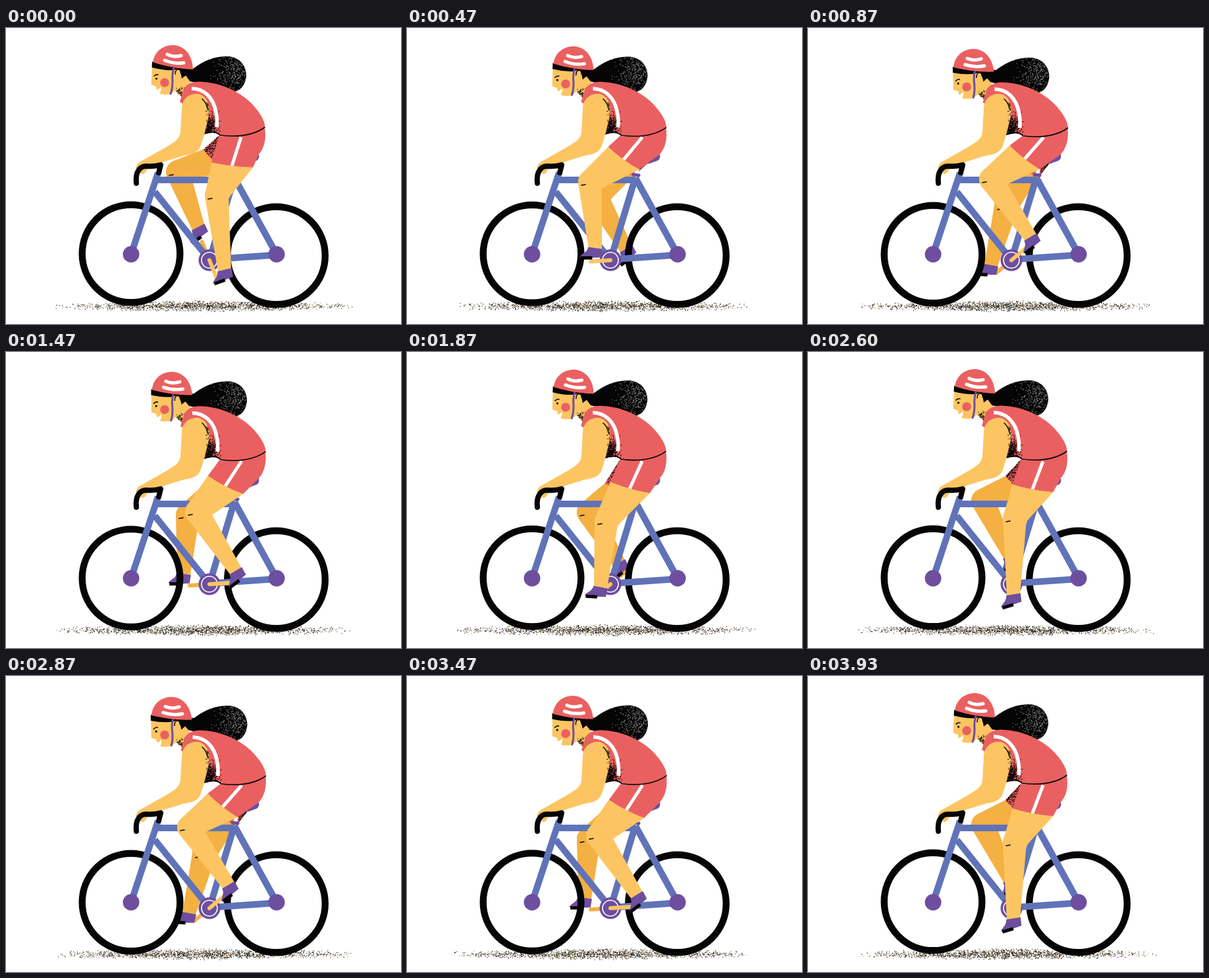
These frames come from a looping animation (600x450 px, 3990 ms). An HTML page with a canvas:

```html
<!DOCTYPE html>
<html lang="en">
<head>
<meta charset="utf-8">
<title>Cyclist</title>
<style>
html, body { margin: 0; width: 100%; height: 100%; overflow: hidden; background: #fff; }
canvas { display: block; width: 600px; height: 450px; }
</style>
</head>
<body>
<canvas id="stage" width="600" height="450"></canvas>
<script>
const ctx = document.getElementById('stage').getContext('2d');
const RED = '#ea6061', SKIN = '#fcc562', SHADE = '#f4b042', BLUE = '#6073b8',
      PURPLE = '#6d4e9f', INK = '#050505', WHITE = '#fff';
const LOOP = 3990, STEP = 200 / 3, COUNT = 60, TURN = 10;
const HUB = [309, 353], CRANK = 30;

// One pedal turn: knee, ankle and foot tilt in degrees
const POSES = [
  [320, 255, 332, 368, -10], [305, 252, 343, 356, -22],
  [290, 243, 349, 333, -28], [278, 230, 338, 318, -28],
  [268, 212, 322, 306, -28], [263, 205, 308, 300, -25],
  [265, 217, 290, 319, -10], [278, 234, 286, 335, 10],
  [303, 257, 294, 358, 13], [314, 253, 312, 369, -7]
];
const BOB = [0, .3, .7, 1, .9, .7, .5, .3, .15, .02];

const SHAPES = {
  torso: 'M264 112L270 92C276 84 286 80 300 82C330 84 365 100 384 128C391 138 394 146 393 152C375 164 350 166 324 163C318 157 308 159 297 162L288 130Z',
  trim: 'M282 92C300 92 315 105 319 128C321 138 321 145 320 151',
  waist: 'M300 161C312 157 320 157 325 163C350 166 375 164 393 151',
  arm: 'M267 122C268 105 281 99 292 100C306 103 312 120 307 138C303 155 300 168 295 181C291 190 282 192 270 194L215 211C214 219 209 224 205 221L197 212L201 205L245 180C258 172 264 168 265 158Z',
  crease: 'M298 108Q304 113 306 122',
  bar: 'M198 236C196 218 204 210 213 210Q226 211 235 208L232 220',
  hair: 'M256 58L284 62C300 50 315 43 338 43C356 45 365 58 365 72C364 88 354 97 345 97C330 97 322 89 304 85C288 81 272 84 264 72Z',
  face: 'M222 58L220.500 86L228 89C228 95 231 101 240 101C247 102 253 100 257 95L268 106L286 90L270 68L262 56Z',
  band: 'M222 51C245 55 262 58 284 62L283 67Q272 72 267 77C266 66 261 61 255 64Q240 65 221.500 60Z',
  helmet: 'M223 52C226 34 240 26 254 26C271 27 283 40 284 63C262 62 245 59 223 52Z',
  vents: 'M245 40Q254 45 266 42M241 49Q255 55 270 53',
  smile: 'M226 95Q232 94 235 90Q237 96 232 100Z',
  strap: 'M255 61Q252 70 253 80Q253 92 250 100',
  ear: 'M257 70Q257 62 263 63',
  brow: 'M225 73Q228 70 231 71',
  shoe: 'M-11 0L11 -1L11 12L-3 15L-21 17C-18 10 -11 9 -11 0Z'
};
for (const key in SHAPES) SHAPES[key] = new Path2D(SHAPES[key]);

function random(seed) {
  let s = (seed * 7919 + 12345) >>> 0;
  return () => {
    s = (s + 0x6d2b79f5) >>> 0;
    let t = Math.imul(s ^ s >>> 15, 1 | s);
    t ^= t + Math.imul(t ^ t >>> 7, 61 | t);
    return ((t ^ t >>> 14) >>> 0) / 4294967296;
  };
}

function fill(shape, color) {
  ctx.fillStyle = color;
  ctx.fill(shape);
}

function stroke(shape, color, width, cap = 'round') {
  ctx.strokeStyle = color;
  ctx.lineWidth = width;
  ctx.lineCap = cap;
  ctx.lineJoin = 'round';
  ctx.stroke(shape);
}

function line(a, b, color, width, cap) {
  const p = new Path2D();
  p.moveTo(...a);
  p.lineTo(...b);
  stroke(p, color, width, cap);
}

function circle(x, y, r) {
  const p = new Path2D();
  p.arc(x, y, r, 0, Math.PI * 2);
  return p;
}

function polygon(points) {
  const p = new Path2D();
  points.forEach(q => p.lineTo(...q));
  p.closePath();
  return p;
}

// Two circles joined by their outer tangents
function limb(a, ra, b, rb) {
  const dx = b[0] - a[0], dy = b[1] - a[1];
  const dir = Math.atan2(dy, dx), off = Math.acos((ra - rb) / Math.hypot(dx, dy));
  const p = new Path2D();
  p.arc(...a, ra, dir + off, dir - off + Math.PI * 2);
  p.arc(...b, rb, dir - off, dir + off);
  p.closePath();
  return p;
}

// Shift, then turn by some degrees about a pivot
function moved(x, y, draw, turn = 0, px = 0, py = 0) {
  ctx.save();
  ctx.translate(x + px, y + py);
  ctx.rotate(turn * Math.PI / 180);
  ctx.translate(-px, -py);
  draw();
  ctx.restore();
}

function clipped(clip, draw) {
  ctx.save();
  ctx.clip(clip);
  draw();
  ctx.restore();
}

function grain(clip, seed, count, x, y, sx, sy, color) {
  const r = random(seed), bell = () => r() + r() + r() - 1.5;
  clipped(clip, () => {
    ctx.fillStyle = color;
    for (let i = 0; i < count; i++) ctx.fillRect(x + bell() * sx, y + bell() * sy, 1.1, 1.1);
  });
}

function ground(seed) {
  const r = random(seed + 100);
  for (let i = 0; i < 1700; i++) {
    const s = r() + r() - 1, v = r() + r() - 1;
    ctx.fillStyle = r() < .72 ? '#16110a' : '#a98a58';
    ctx.fillRect(300 + s * 230, 422.5 + v * 9 * (1 - .4 * Math.abs(s)), 1.1, 1.1);
  }
}

function pedal(phase) {
  const a = (68 - 36 * phase) * Math.PI / 180;
  return [HUB[0] + CRANK * Math.cos(a), HUB[1] + CRANK * Math.sin(a)];
}

function leg(phase, far, bob) {
  const [kx, ky, ax, ay, tilt] = POSES[phase];
  const hip = far ? [346, 190] : [352 + bob, 180];
  const knee = far ? [kx - 2, ky + 14] : [kx, ky];
  const ankle = far ? [ax - 16, ay + 3] : [ax, ay];
  const skin = far ? SHADE : SKIN;
  const dx = knee[0] - hip[0], dy = knee[1] - hip[1], len = Math.hypot(dx, dy);
  const ux = dx / len, uy = dy / len;
  // u runs down the thigh, v towards its back
  const at = (u, v) => [hip[0] + ux * u + uy * v, hip[1] + uy * u - ux * v];
  const front = far ? at(42, -20) : at(38, -27);
  const back = far ? at(28, 22) : at(20, 20 + 15 * uy);

  line(HUB, pedal(phase), skin, 6);
  fill(limb(hip, far ? 22 : 26, knee, 18), skin);
  fill(polygon([front, back, at(len, 17), at(len, -18)]), skin);
  fill(limb(knee, 18, ankle, 10), skin);
  line([knee[0] - 13, knee[1] + 5], [knee[0] - 7, knee[1] + 4], INK, 1.6);

  moved(...ankle, () => {
    fill(SHAPES.shoe, PURPLE);
    line([-19, 18], [-2, 15], INK, 5, 'butt');
  }, tilt);

  const shorts = new Path2D();
  shorts.moveTo(323 + bob * 1.5, 164 + bob);
  if (far) {
    shorts.lineTo(372, 180);
    shorts.lineTo(371, 200);
  } else {
    shorts.quadraticCurveTo(362, 168, 393 + bob * 1.5, 151 + bob);
    shorts.quadraticCurveTo(397, 177, 384, 192);
  }
  shorts.lineTo(...back);
  shorts.quadraticCurveTo(...at(33, 2), ...front);
  shorts.closePath();
  fill(shorts, RED);
  if (far) {
    grain(shorts, 3, 1300, 321, 172, 34, 34, INK);
    grain(shorts, 4, 800, 364, 206, 13, 30, INK);
    clipped(shorts, () => line([354, 194], [348, 224], WHITE, 6, 'butt'));
  } else {
    clipped(shorts, () => line([357 + bob, 166], at(36, 4), WHITE, 5, 'butt'));
  }
}

function bike(bob) {
  stroke(circle(190, 343 + bob, 74.3), INK, 10.4);
  stroke(circle(410.5, 346, 74.3), INK, 10.4);
  line([377, 195], [366, 199], PURPLE, 15);
  const tubes = [
    [[231, 220], [190, 344]], [[229, 231], [347, 231]], [[226, 249], [306, 349]],
    [[347, 227], [309, 353]], [[347, 228], [411, 344]], [[309, 352], [411, 345]]
  ];
  tubes.forEach(([a, b]) => line(a, b, BLUE, 10, 'butt'));
  line([344, 223], [352, 224], PURPLE, 5);
  fill(circle(190, 344, 12.5), PURPLE);
  fill(circle(411, 344, 12.5), PURPLE);
  fill(circle(...HUB, 16.5), PURPLE);
  stroke(circle(...HUB, 12), WHITE, 1.6);
}

function head() {
  fill(SHAPES.face, SKIN);
  grain(SHAPES.face, 5, 130, 265, 100, 9, 9, INK);
  fill(circle(241, 83, 6.8), RED);
  fill(circle(228.5, 77, 1.6), INK);
  stroke(SHAPES.brow, INK, 1.5);
  fill(SHAPES.smile, WHITE);
  fill(SHAPES.band, INK);
  fill(SHAPES.helmet, RED);
  stroke(SHAPES.vents, WHITE, 5);
  fill(circle(260, 67, 4.5), SKIN);
  stroke(SHAPES.ear, INK, 1.5);
  stroke(SHAPES.strap, PURPLE, 3);
}

function torso() {
  fill(SHAPES.torso, RED);
  grain(SHAPES.torso, 6, 1300, 304, 153, 17, 23, INK);
  stroke(SHAPES.trim, WHITE, 5.5, 'butt');
  stroke(SHAPES.waist, INK, 1.6);
}

function draw(frame) {
  const phase = frame % TURN, bob = BOB[phase];
  ctx.fillStyle = WHITE;
  ctx.fillRect(0, 0, 600, 450);
  ground(frame);
  leg((phase + TURN / 2) % TURN, true, bob);
  bike(bob);
  moved(1.5 * bob, 2 * bob, () => {
    fill(SHAPES.hair, INK);
    grain(SHAPES.hair, 7, 420, 350, 63, 32, 32, '#9a9a9a');
  });
  moved(0, 6.5 * bob, head, -4 * bob, 241, 83);
  leg(phase, false, bob);
  moved(1.5 * bob, bob, torso);
  fill(SHAPES.arm, SKIN);
  grain(SHAPES.arm, 8, 90, 308, 126, 5, 30, INK);
  stroke(SHAPES.crease, INK, 1.6);
  stroke(SHAPES.bar, INK, 8);
}

let shown = -1;
const start = performance.now();
function tick() {
  const t = (performance.now() - start) % LOOP;
  const frame = Math.min(COUNT - 1, Math.floor((t + 5) / STEP));
  if (frame !== shown) draw(shown = frame);
  requestAnimationFrame(tick);
}
tick();
</script>
</body>
</html>
```
